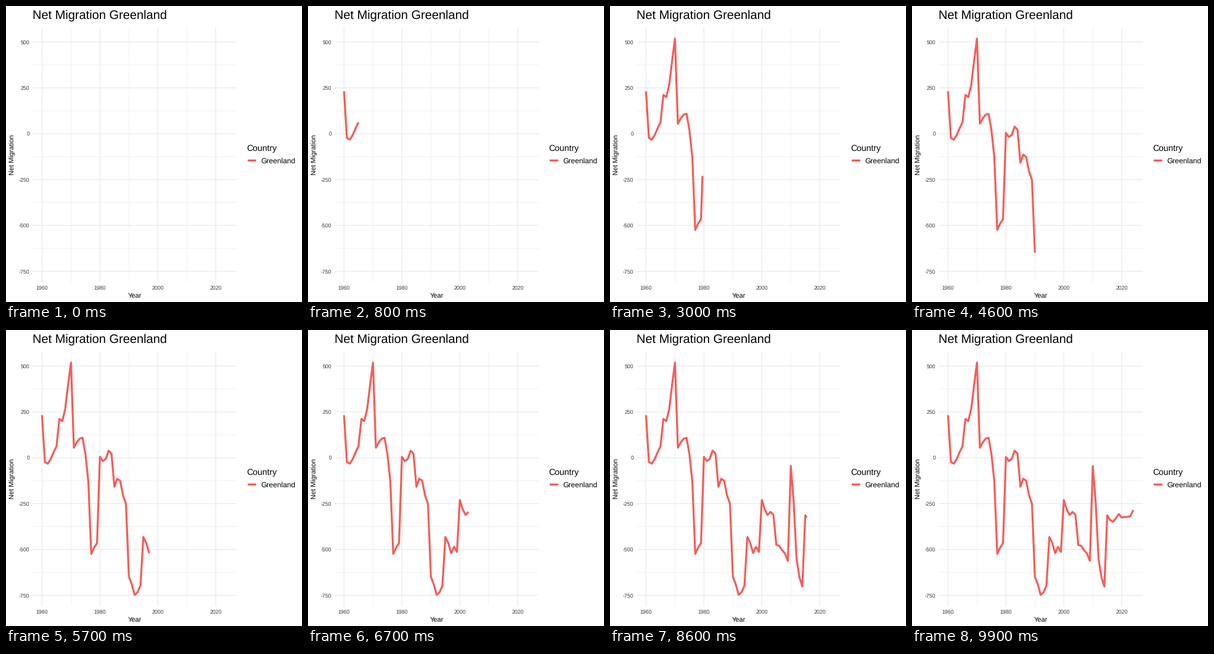
A matplotlib script that plays this animation: 480x480 px, repeating every 10 s.

```python
import matplotlib.pyplot as plt
import numpy as np
from matplotlib.animation import FuncAnimation

SIZE, DPI = 480, 80
FRAMES, INTERVAL = 100, 100
PT = 72 / DPI  # points per pixel

RED, GRID, TICK = "#F35E5A", "#E7E7E7", "#3C3C3C"
LEFT, RIGHT, TOP, BOTTOM = 43.4, 374.0, 34.2, 448.0

plt.rcParams["font.family"] = "Liberation Sans"
plt.rcParams["text.hinting"] = "none"

# Net migration per year, 1960 to 2024
net = np.array([
    232, -23, -32, -7, 30, 62, 212, 200, 265, 396,
    519, 55, 84, 104, 109, 20, -130, -524, -490, -465,
    5, -18, -7, 39, 22, -158, -114, -126, -206, -251,
    -648, -690, -748, -733, -697, -432, -464, -520, -486, -513,
    -230, -281, -312, -295, -311, -475, -480, -504, -522, -562,
    -45, -240, -552, -652, -702, -314, -340, -349, -329, -307,
    -326, -323, -322, -318, -285,
])
years = 1960 + np.arange(len(net))


def x_px(year):
    return 58.4 + (year - 1960) * 4.695


def y_px(value):
    return 207.2 - value * 0.2974


# Each year is reached on a whole frame; steps between are linear
keys = np.round(np.arange(len(net)) * (FRAMES - 1) / (len(net) - 1))
xs, ys = x_px(years), y_px(net)

fig = plt.figure(figsize=(SIZE / DPI, SIZE / DPI), dpi=DPI, facecolor="white")
ax = fig.add_axes([0, 0, 1, 1])
ax.set_xlim(0, SIZE)
ax.set_ylim(SIZE, 0)
ax.axis("off")


def stroke(x, y, color, width, z=1):
    line, = ax.plot(x, y, color=color, lw=width * PT, zorder=z, snap=False,
                    solid_capstyle="butt", solid_joinstyle="round")
    return line


def label(x, y, text, size, color="black", ha="left", **kw):
    ax.text(x, y, text, fontsize=size * PT, color=color, ha=ha,
            va=kw.pop("va", "baseline"), **kw)


def v_line(year, width):
    stroke([x_px(year)] * 2, [TOP, BOTTOM], GRID, width)


def h_line(value, width):
    stroke([LEFT, RIGHT], [y_px(value)] * 2, GRID, width)


for year in (1970, 1990, 2010):
    v_line(year, 0.55)
for value in range(-625, 376, 250):
    h_line(value, 0.55)
for year in range(1960, 2021, 20):
    v_line(year, 1.07)
    label(x_px(year), 460, str(year), 8.8, TICK, "center")
for value in range(-750, 501, 250):
    h_line(value, 1.07)
    label(38.5, y_px(value) + 3.2, str(value), 8.8, TICK, "right")

label(43.2, 21, "Net Migration Greenland", 20)
label((LEFT + RIGHT) / 2, 473, "Year", 11, ha="center")
label(13.5, (TOP + BOTTOM) / 2, "Net Migration", 11, ha="right", va="center",
      rotation=90, rotation_mode="default") if False else \
    ax.text(13.5, (TOP + BOTTOM) / 2, "Net Migration", fontsize=11 * PT,
            rotation=90, rotation_mode="anchor", ha="center", va="baseline")
label(390, 235, "Country", 14)
label(413, 255, "Greenland", 12)
stroke([392, 405.8], [250.5, 250.5], RED, 3.2)

trace = stroke([], [], RED, 3.2, z=3)


def init():
    trace.set_data([], [])
    return trace,


def update(i):
    if i == 0:
        return init()
    past = keys < i
    trace.set_data(np.append(xs[past], np.interp(i, keys, xs)),
                   np.append(ys[past], np.interp(i, keys, ys)))
    return trace,


anim = FuncAnimation(fig, update, frames=FRAMES, init_func=init,
                     interval=INTERVAL, repeat=True, repeat_delay=0)
plt.show()
```
